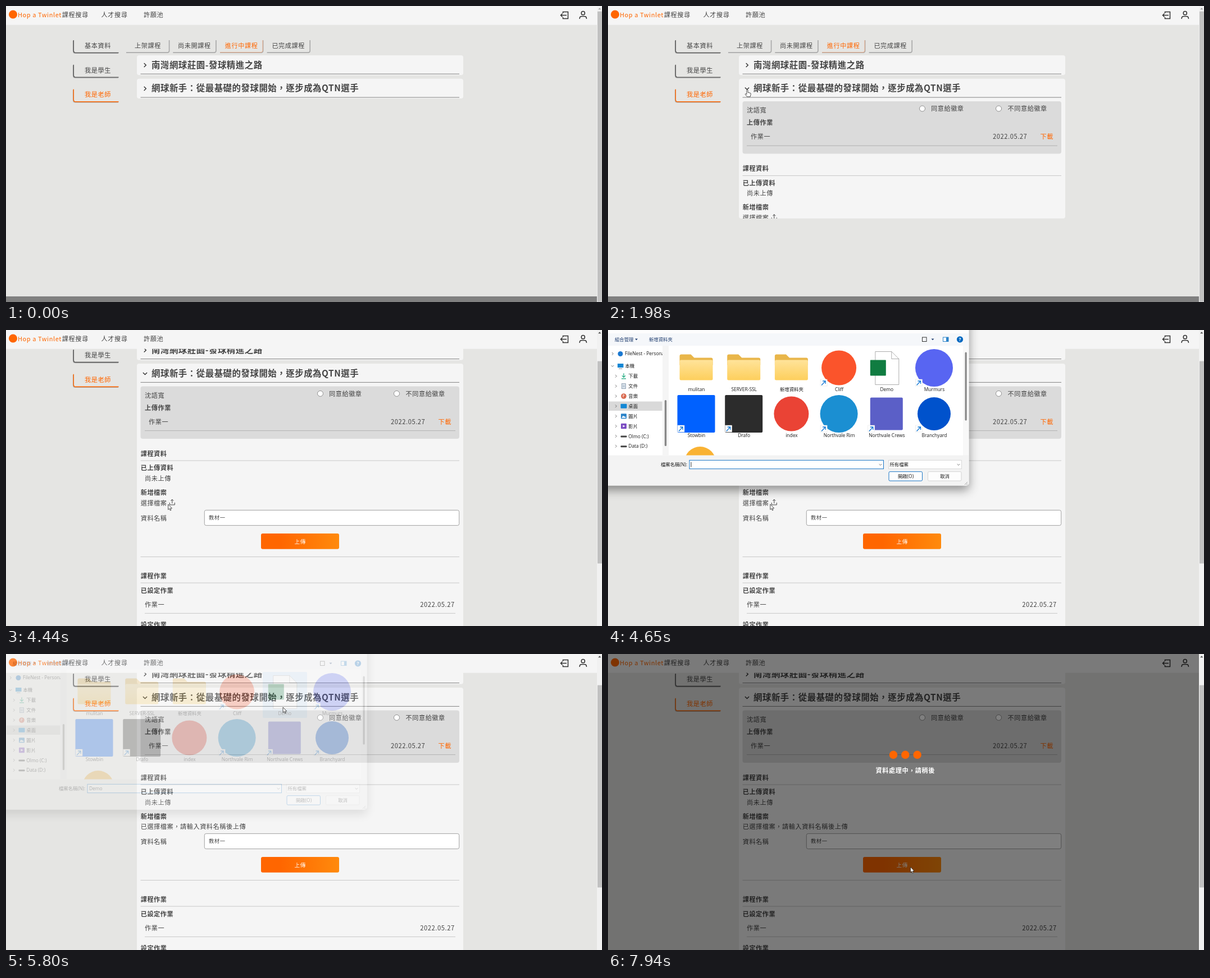
An HTML page that plays this animation: 1061 by 528 pixels, repeating every 8000 ms.

```html
<!DOCTYPE html>
<html lang="zh-Hant">
<head>
<meta charset="utf-8">
<title>Course page</title>
<style>
html, body { margin: 0; width: 100%; height: 100%; overflow: hidden; background: #e5e5e3; }
svg { display: block; width: 1061px; height: 528px; }
text { font-family: "Noto Sans CJK TC", "Noto Sans CJK JP", sans-serif; letter-spacing: .56px; fill: #444; }
.ui text { font-family: "Open Sans", "Noto Sans CJK TC", sans-serif; letter-spacing: 0; fill: #1b1b1b; }
</style>
</head>
<body>
<svg id="stage" viewBox="0 0 1061 528" xmlns="http://www.w3.org/2000/svg"></svg>
<script>
const LOOP = 8000, ORANGE = '#ff6600', INK = '#444';
const stage = document.getElementById('stage');

// Markup helpers; text is placed by its vertical centre.
const text = (x, cy, s, { size = 11.17, bold, fill, anchor, extra = '' } = {}) =>
  `<text x="${x}" y="${cy + size * .37}" font-size="${size}"${bold ? ' font-weight="700"' : ''}` +
  `${fill ? ` style="fill:${fill}"` : ''}${anchor ? ` text-anchor="${anchor}"` : ''} ${extra}>${s}</text>`;
const bold = (x, cy, s) => text(x, cy, s, { bold: true });
const rect = (x, y, w, h, fill, extra = '') =>
  `<rect x="${x}" y="${y}" width="${w}" height="${h}" fill="${fill}" ${extra}/>`;
const circle = (x, y, r, fill, extra = '') => `<circle cx="${x}" cy="${y}" r="${r}" fill="${fill}" ${extra}/>`;
const stroke = (d, color = INK, w = 1, extra = '') =>
  `<path d="${d}" fill="none" stroke="${color}" stroke-width="${w}" ${extra}/>`;
const rule = (x1, x2, y, color = '#bdbdbd', w = .8) => stroke(`M${x1} ${y}H${x2}`, color, w);
const chevron = (x, y, id) =>
  `<g transform="translate(${x} ${y})"><g id="${id}">${stroke('M-1.8-3.6L1.8 0L-1.8 3.6', '#333', 1.4)}</g></g>`;

const sideItem = (s, i) => {
  const y = 61 + i * 43.7, color = i === 2 ? ORANGE : '#555';
  const edge = `M120.3 ${y}v18.6q0 3.8 3.8 3.8H200.5`;
  return stroke(edge, '#aaa', 1.4, 'transform="translate(-.7 1)"') + stroke(edge, color, 1.4) +
    text(140, y + 9.7, s, { fill: i === 2 ? ORANGE : '' });
};
const tab = ([x, s], i) => {
  const active = i === 2;
  return stroke(`M${x} 83.2h73q3.6 0 3.6-3.6V61`, '#aaa', 1.7) +
    (active ? stroke(`M${x} 82.6h73q3 0 3-3.6V61`, '#ffab78', .7) : '') +
    text(x + (i ? 8.8 : 15), 70.7, s, { fill: active ? ORANGE : '' });
};

const details = `
  ${rect(239.5, 170, 567.5, 93.6, '#dbdbdb', 'rx="4"')}
  ${text(247, 186.3, '沈語寬')}${bold(247, 208, '上傳作業')}
  ${[[559.5, 575, '同意給徽章'], [695.5, 711.5, '不同意給徽章']].map(([c, x, s]) =>
    circle(c, 183, 5, '#fff', 'stroke="#777" stroke-width=".8"') + text(x, 183, s)).join('')}
  ${text(254, 233, '作業一')}${text(685, 233, '2022.05.27')}${text(769.5, 233, '下載', { fill: ORANGE })}
  ${rule(247, 800, 249.2, '#a8a8a8')}
  ${bold(239.7, 290, '課程資料')}${rule(239.5, 807, 302.6)}
  ${bold(239.7, 315.6, '已上傳資料')}${text(247, 334, '尚未上傳')}
  ${bold(239.7, 359, '新增檔案')}
  <g id="below">
    <g id="choose">${text(239.7, 378, '選擇檔案')}
      ${stroke('M291.3 377.5v4h9v-4M295.8 379V371.8M293.2 374.4l2.6-2.6 2.6 2.6', INK, 1)}</g>
    <g id="chosen">${text(239.7, 378, '已選擇檔案，請輸入資料名稱後上傳')}</g>
    ${text(239.7, 405, '資料名稱')}
    ${rect(353.3, 391, 453.4, 27.2, '#fff', 'rx="3" stroke="#8c8c8c" stroke-width=".8"')}
    ${text(361, 404.2, '教材一', { size: 9.3, extra: 'letter-spacing="0"' })}
    ${rect(454, 432.5, 139, 27.8, 'url(#warm)', 'rx="3"')}
    ${text(523.7, 446.6, '上傳', { size: 9.6, fill: '#fff', anchor: 'middle', extra: 'font-weight="500"' })}
    ${rule(239.5, 807, 474.2)}
    ${bold(239.7, 508.5, '課程作業')}${rule(239.5, 807, 520.7)}
    ${bold(239.7, 534, '已設定作業')}
    ${text(247, 559, '作業一')}${text(737.3, 559, '2022.05.27')}${rule(247, 800, 575)}
    ${bold(239.7, 595, '設定作業')}
  </g>`;

const title = (cy, s) => text(259, cy, s, { size: 15.4, bold: true });
const page = `
  <g id="page">
    ${['基本資料', '我是學生', '我是老師'].map(sideItem).join('')}
    ${[[214, '上架課程'], [297.3, '尚未開課程'], [381, '進行中課程'], [464.6, '已完成課程']].map(tab).join('')}
    ${rect(233, 88, 581, 35.3, '#f5f5f5', 'rx="4"')}
    ${chevron(247.5, 105.5, 'closed')}${title(105, '南灣網球莊園-發球精進之路')}${rule(239.5, 807, 121.2, '#666')}
    ${rect(233, 129.7, 581, 35.3, '#f5f5f5', 'rx="4" id="panel"')}
    ${chevron(247.5, 147.3, 'arrow')}${title(146.8, '網球新手：從最基礎的發球開始，逐步成為QTN選手')}
    ${rule(239.5, 807, 163, '#666')}
    <g clip-path="url(#fold)">${details}</g>
    ${rect(0, 518, 1052, 40, '#808080', 'id="footer"')}
  </g>
  ${rect(0, 0, 1052, 33.7, '#f5f5f5')}
  ${circle(12.5, 15, 7.5, ORANGE)}
  ${text(21, 16, 'Hop a Twinlet', { size: 11, fill: ORANGE, extra: 'font-family="Lato, sans-serif"' })}
  ${text(99.8, 16, '課程搜尋')}${text(169.5, 16, '人才搜尋')}${text(245, 16, '許願池')}
  ${stroke('M991.5 13v-2.6h9v12.2h-9V20M998 16.5H987.5M990.5 13.5l-3 3 3 3', '#333', 1.5)}
  ${circle(1027.3, 12.7, 3.1, 'none', 'stroke="#333" stroke-width="1.5"')}
  ${stroke('M1021.2 23v-.8q0-3.7 3.8-3.7h4.6q3.8 0 3.8 3.7v.8', '#333', 1.5)}`;

const scrollbar = rect(1052, 0, 9, 528, '#f1f1f1') +
  '<path id="up" d="M1054.2 6.3l2.6-3 2.6 3z"/>' + rect(1053, 10, 8, 518, '#c1c1c1', 'id="thumb"');

// File dialog
const ui = (x, cy, s, o = {}) => text(x, cy, s, { size: 8.4, ...o });
const caret = (x, y, open) =>
  stroke(open ? `M${x - 2.4} ${y - 1}l2.4 2.4 2.4-2.4` : `M${x - 1} ${y - 2.4}l2.4 2.4-2.4 2.4`, '#555', .8);
const tree = [['下載', '#18a77b'], ['文件', '#8295a8'], ['音樂', '#d9694f'], ['桌面', '#1487d4'],
  ['圖片', '#2b83c9'], ['影片', '#7b4cc2'], ['Olmo (C:)', '#444'], ['Data (D:)', '#444']];
const treeIcon = (i, y, c) => [
  () => stroke(`M28 ${y - 5}v7m-3-3l3 3 3-3M24 ${y + 4.5}h8`, c, 1.2),
  () => rect(24.5, y - 4.5, 7, 9, '#d5dfe8', `stroke="${c}" stroke-width=".8"`) + rule(26, 30, y, c),
  () => circle(28, y, 4.8, c) + stroke(`M27 ${y + 2}v-4.5l2.5 1`, '#fff', 1),
  () => rect(22.5, y - 4, 11, 8, c, 'rx="1"'),
  () => rect(23, y - 4.5, 10, 9, c, 'rx="1"') + `<path d="M24 ${y + 3}l3-4 2 2 1-1 2 3z" fill="#fff"/>`,
  () => rect(23, y - 4.8, 10, 9.6, c, 'rx="1"') + `<path d="M26.5 ${y - 2}l4 2-4 2z" fill="#fff"/>`,
][Math.min(i, 6)]?.() ?? rect(22.5, y - 1, 11, 3, c, 'rx="1"');

const folder = (x, y) =>
  `<path d="M${x - 29.5} ${y - 21}q0-3 3-3h17l6 6h30q3 0 3 3v10h-59z" fill="#e9b64a"/>` +
  rect(x - 29.5, y - 14, 59, 36, 'url(#folder)', 'rx="2.5"');
const disc = (c, r = 31) => (x, y) => circle(x, y, r, c);
const block = (c, w = 67) => (x, y) => rect(x - w / 2, y - w / 2, w, w, c, 'rx="2"');
const sheet = (x, y) =>
  `<path d="M${x - 20} ${y - 29}h29l13 13v46h-42z" fill="#fff" stroke="#999" stroke-width=".8"/>` +
  stroke(`M${x + 9} ${y - 29}v13h13`, '#999', .8) + rect(x - 29, y - 14, 28, 28, '#107c41', 'rx="1"');
const files = [
  ['mulitan', folder], ['SERVER-SSL', folder], ['新增資料夾', folder], ['Cliff', disc('#fb542b'), 1],
  ['Demo', sheet], ['Murmurs', disc('#5865f2', 33.5), 1], ['Stowbin', block('#0061ff'), 1],
  ['Drafo', block('#2c2c2c'), 1], ['index', disc('#ea4335')], ['Northvale Rim', disc('#1b8fd2', 33.5), 1],
  ['Northvale Crews', block('#5b5fc7', 58), 1], ['Branchyard', disc('#0052cc', 29.5), 1]];
const file = ([name, icon, link], i) => {
  const x = 157 + (i % 6) * 84.7, row = Math.floor(i / 6) * 82, y = 67.5 + row;
  return icon(x, y) + (link ? rect(x - 33, y + 20.5, 12, 12, '#fff', 'stroke="#ddd" stroke-width=".5"') +
    stroke(`M${x - 31} ${y + 31}l7-7.5m-5 0h5v5`, '#1478d4', 1.3) : '') +
    ui(x + .5, 106 + row, name, { anchor: 'middle' });
};
const button = (x, s, color) =>
  rect(x, 252.7, 59.5, 16.4, '#fdfdfd', `rx="2" stroke="${color}" stroke-width=".9"`) +
  ui(x + 30, 261, s, { anchor: 'middle' });

const dialog = `
  <g id="dialog" class="ui">
    ${rect(-40, -40, 682.5, 317.5, '#f3f3f3', 'rx="5" filter="url(#shadow)"')}
    ${rect(0, 0, 642, 6, '#fdfdfd')}${rect(0, 6, 642, 22, '#f5f7fa')}${rect(0, 28, 632, 195.5, '#fff')}${rect(632, 28, 10, 195.5, '#f8f8f8')}
    ${ui(12, 16.5, '組合管理', { fill: '#1e3c6e' })}<path d="M48 15.5h5l-2.5 2.8zM575.5 15.5h5l-2.5 2.8z" fill="#1e3c6e"/>
    ${ui(73, 16.5, '新增資料夾', { fill: '#1e3c6e' })}
    ${rect(559.5, 13, 7.5, 7.5, 'none', 'stroke="#333"')}
    ${rect(596.5, 13, 9.5, 7.5, '#fff', 'stroke="#2b83c9"')}${rect(602, 13, 4, 7.5, '#2b83c9')}
    ${circle(626.5, 16.8, 5.6, '#0067c0')}${ui(626.5, 16.5, '?', { fill: '#fff', anchor: 'middle', bold: true })}
    ${rect(1, 127.5, 95.5, 16.5, '#d9d9d9')}
    ${caret(8, 42.3)}${circle(22, 42.5, 4.5, '#1a78d0')}
    <g clip-path="url(#treeClip)">${ui(30, 42.3, 'FileNest - Personal')}</g>
    ${caret(8, 64, 1)}${rect(17, 60, 10.5, 7, '#1487d4')}${rule(19, 25.5, 69, '#567')}${ui(30.5, 64.3, '本機')}
    ${tree.map(([s, c], i) => { const y = 82.3 + i * 17.85;
      return caret(14, y) + treeIcon(i, y, c) + ui(36.3, y, s); }).join('')}
    ${rect(97, 28, 11, 195.5, '#f5f5f5')}${rect(100.8, 125, 3.4, 82, '#888', 'rx="1.5"')}${rect(635.5, 39.5, 3.2, 122, '#888', 'rx="1.5"')}
    <g id="selection">${rect(457, 32, 79, 82, '#cce8ff', 'rx="2"')}</g>
    ${files.map(file).join('')}
    <g clip-path="url(#listClip)">${circle(164, 236, 28, '#f9b233')}</g>
    ${ui(141, 240, '檔案名稱(N):', { anchor: 'end' })}
    ${rect(145, 232.3, 345.5, 15.4, '#fff', 'stroke="#0067c0" stroke-width=".9"')}${caret(485, 240, 1)}
    ${stroke('M148 235.5v9', '#111', .8, 'id="textCaret"')}<g id="fileName">${ui(148, 240, 'Demo')}</g>
    ${rect(499.5, 232.3, 130, 15.4, '#fff', 'stroke="#d0d0d0" stroke-width=".8"')}${ui(501.5, 240, '所有檔案')}${caret(624, 240, 1)}
    ${button(500, '開啟(O)', '#0067c0')}${button(569.5, '取消', '#d0d0d0')}
    ${stroke('M635 276l5-5M638 276l2-2', '#999', .9)}
  </g>`;

stage.innerHTML = `
  <defs>
    <linearGradient id="warm"><stop offset=".25" stop-color="#ff6600"/><stop offset="1" stop-color="#ff8a0c"/></linearGradient>
    <linearGradient id="folder" x2="0" y2="1"><stop stop-color="#ffe39a"/><stop offset="1" stop-color="#fdcf5c"/></linearGradient>
    <filter id="shadow" x="-10%" y="-10%" width="120%" height="130%"><feDropShadow dx="0" dy="8" stdDeviation="9" flood-opacity=".42"/></filter>
    <clipPath id="fold"><rect id="foldRect" x="233" y="163" width="581" height="0"/></clipPath>
    <clipPath id="treeClip"><rect y="28" width="97" height="195"/></clipPath>
    <clipPath id="listClip"><rect x="108" y="28" width="524" height="195.5"/></clipPath>
  </defs>
  ${rect(0, 0, 1061, 528, '#e5e5e3')}${page}
  <g id="overlay">${rect(0, 0, 1052, 528, '#000', 'opacity=".5"')}
    ${[508, 529.3, 550.6].map((x, i) => circle(x, 179.8, 7.2, ORANGE, `id="dot${i}"`)).join('')}
    ${text(529.3, 207.7, '資料處理中，請稍後', { bold: true, fill: '#fff', anchor: 'middle' })}</g>
  ${scrollbar}${dialog}
  ${circle(0, 0, 8.6, '#ffc800', 'id="click"')}
  <g id="cursor" stroke-width=".8" stroke="#222" fill="#fff" stroke-linejoin="round">
    <path id="pointer" d="M0 0V9.5L2.2 7.6 3.7 11 5.2 10.3 3.8 7.1H6.8Z"/>
    <path id="hand" d="M-1.1 1Q0-.7 1.1 1V5L5 5.8Q6.6 6.2 6.2 8.2L5.2 12.5H-.4L-3.7 8.4Q-3.6 6.8-2.4 7.3L-1.1 8.5Z"/>
  </g>`;

// Timeline
const el = Object.fromEntries([...stage.querySelectorAll('[id]')].map(n => [n.id, n]));
const set = (id, attrs) => { for (const k in attrs) el[id].setAttribute(k, attrs[k]); };
const show = (id, on) => set(id, { visibility: on ? 'visible' : 'hidden' });
const clamp = p => Math.min(1, Math.max(0, p));
const ramp = (t, a, b) => clamp((t - a) / (b - a));
const smooth = p => p * p * (3 - 2 * p);

const sample = (keys, t) => {
  const i = keys.findIndex(k => k[0] > t);
  if (i < 0) return keys[keys.length - 1].slice(1);
  if (!i) return keys[0].slice(1);
  const [a, b] = [keys[i - 1], keys[i]], p = smooth(ramp(t, a[0], b[0]));
  return a.slice(1).map((v, j) => v + (b[j + 1] - v) * p);
};
const cursorPath = [
  [400, 992, 510], [1250, 279, 185], [1300, 279, 185], [1700, 248, 149.3], [2190, 248, 149.3], [2470, 362, 162],
  [3270, 362, 162], [3890, 288.7, 311], [4640, 288.7, 311], [5320, 455.5, 105.3], [5470, 497, 72],
  [5700, 497, 72], [6000, 482, 159], [6070, 482, 159], [6700, 536, 391], [6920, 538.5, 380]];
const scrollKeys = [[3180, 0], [3300, 39], [3440, 69.6]];
const clicks = [[1840, 1960], [4030, 4300], [5530, 5720], [7040, 7250]];

function render(t) {
  const scroll = t < 3210 ? 0 : t < 3270 ? 19.5 : sample(scrollKeys, t)[0];
  const open = 1 - (1 - ramp(t, 1900, 2290)) ** 2;
  const bottom = 165 + 575 * open, footer = Math.max(518, bottom + 8);
  const picked = t >= 5790;

  set('page', { transform: `translate(0 ${-scroll})` });
  set('panel', { height: bottom - 129.7 });
  set('foldRect', { height: open ? bottom - 163 : 0 });
  set('arrow', { transform: `rotate(${90 * ramp(t, 1880, 1980)})` });
  set('footer', { y: footer });
  set('thumb', { y: 9.7 + .66 * scroll, height: 518 * 528 / (footer + 10) });
  set('up', { fill: scroll ? '#505050' : '#a3a3a3' });
  set('below', { transform: `translate(0 ${picked ? -1 : 0})` });
  show('choose', !picked);
  show('chosen', picked);

  set('dialog', { opacity: ramp(t, 4500, 4640) * (1 - ramp(t, 5740, 5820)) });
  const selected = t >= 5560;
  show('selection', selected);
  show('fileName', selected);
  show('textCaret', !selected);

  show('overlay', t >= 7270);
  for (let i = 0; i < 3; i++) {
    const p = ramp(t, 7280 + i * 140, 7650 + i * 140);
    set('dot' + i, { cy: 179.8 + 10 * Math.sin(p * 2 * Math.PI) });
  }

  const [x, y] = sample(cursorPath, t);
  const hand = (t >= 1480 && t < 3700) || (t >= 3850 && t < 4440);
  set('cursor', { transform: `translate(${x} ${y})`, opacity: t < 450 ? 0 : 1 });
  show('pointer', !hand);
  show('hand', hand);
  const press = clicks.find(([a, b]) => t >= a && t < b);
  set('click', { cx: x, cy: y, opacity: press ? .8 * (1 - ramp(t, (press[0] + press[1]) / 2, press[1])) : 0 });
}

const start = performance.now();
function tick() {
  render((performance.now() - start) % LOOP);
  requestAnimationFrame(tick);
}
tick();
</script>
</body>
</html>
```
